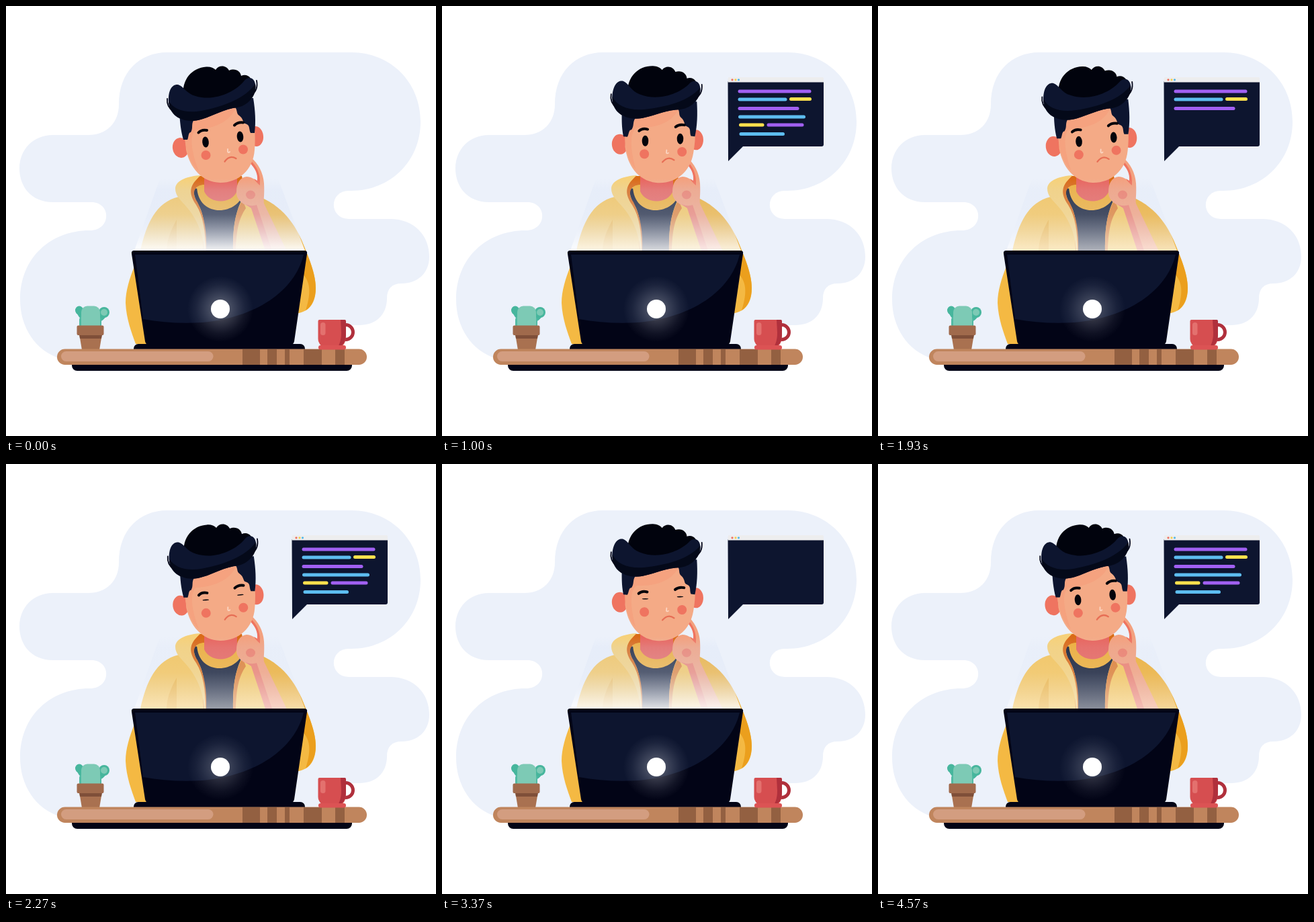
An HTML page with a canvas that plays this animation: 640x640 px, repeating every 4.76 s.

```html
<!DOCTYPE html>
<html lang="en">
<head>
<meta charset="utf-8">
<title>Thinking at the laptop</title>
<style>
html, body { margin: 0; width: 100%; height: 100%; overflow: hidden; background: #fff; }
canvas { display: block; width: 640px; height: 640px; }
</style>
</head>
<body>
<canvas id="stage" width="640" height="640"></canvas>
<script>
const ctx = document.getElementById('stage').getContext('2d');
const LOOP = 4760;
const NAVY = '#0d152f', INK = '#020416', SKIN = '#f4aa86', CORAL = '#ef7460';
const PURPLE = '#a160f2', BLUE = '#5dbdf0', YELLOW = '#ffe14d';

const clamp = v => Math.max(0, Math.min(1, v));
const smooth = v => v * v * (3 - 2 * v);

function fill(d, color) {
  ctx.fillStyle = color;
  ctx.fill(new Path2D(d));
}
function stroke(d, color, width) {
  ctx.strokeStyle = color;
  ctx.lineWidth = width;
  ctx.lineCap = ctx.lineJoin = 'round';
  ctx.stroke(new Path2D(d));
}
function box(x, y, w, h, r, color) {
  ctx.fillStyle = color;
  ctx.beginPath();
  ctx.roundRect(x, y, w, h, r);
  ctx.fill();
}
function oval(x, y, rx, ry, color, turn = 0) {
  ctx.fillStyle = color;
  ctx.beginPath();
  ctx.ellipse(x, y, rx, ry, turn, 0, 7);
  ctx.fill();
}

// Eased value along [time, value] keys.
function along(keys, t) {
  for (let i = 1; i < keys.length; i++) {
    const [t0, a] = keys[i - 1], [t1, b] = keys[i];
    if (t <= t1) return a + (b - a) * smooth(clamp((t - t0) / (t1 - t0)));
  }
  return keys[keys.length - 1][1];
}

const TILT = [[0, 0], [480, 1], [990, .92], [1430, 1], [2190, .1], [2380, 0]];
const LIGHT = [[0, 1], [470, .62], [1000, .88], [1530, .8], [2270, .6],
  [2800, .55], [3370, .92], [3870, .66], [4570, .52]];
const BLINKS = [1170, 2270, 3370, 4470];
const TYPING = [[190, 1450], [1640, 3300], [3485, LOOP]];
const ROW_STEP = 105, ROW_TIME = 70;
const ROWS = [
  [[441, 549, 127, PURPLE]],
  [[441, 513, 139, BLUE], [517.5, 549.5, 138.5, YELLOW]],
  [[441, 531, 152.5, PURPLE]],
  [[441.5, 540.5, 165, BLUE]],
  [[442.5, 479, 177, YELLOW], [484, 538, 177, PURPLE]],
  [[443, 509.5, 190.5, BLUE]]
];

function backdrop() {
  fill(`M240 69H514C573 69 617 114 617 172C617 232 571 275 514 275H510
    C481 275 480 316 510 317H572C607 317 630 341 630 373C630 398 612 413 589 413
    C574 413 567 421 567 435C567 461 549 475 526 475H490V525H82
    C44 514 21 478 21 437C21 376 65 334 125 334C157 334 157 292 127 292H70
    C37 292 20 268 20 242C20 214 40 192 70 192H122C150 192 168 174 168 146
    C168 99 198 69 240 69Z`, '#ecf1fa');
}

function body() {
  fill('M191 388C184 405 178 424 178 442C179 466 187 486 193 503H214L206 380Z', '#f4b943');
  fill('M436 342C452 375 461 400 461 420C461 444 450 456 430 458V340Z', '#f4b943');
  fill('M436 342C452 375 461 400 461 420C461 435 455 448 446 453C453 431 455 412 441 398Z', '#eb9f1d');
  fill('M257 284C223 292 209 324 200 364V385H340L350 270H280Z', '#f6c55a');
  fill('M386 288C421 306 437 338 446 364V385H340L350 270Z', '#efb035');
  fill('M254 318C244 336 239 350 239 366H254Z', '#eeb33f');
  fill('M283 253H351L358 285L340 366H297L296 330Z', '#d96c14');
  fill('M280 271L353 284C346 302 338 323 338 366H298C297 332 295 310 286 295C280 285 279 278 280 271Z', '#172038');
  fill('M284 268C285 318 348 311 353 277L343 266H293Z', '#efae38');
  fill('M295 253V276C303 295 336 296 344 275V253Z', '#e8665f');
  // hood edges
  fill('M282 253C294 252 297 260 294 265C281 268 275 277 285 292C296 315 299 336 298 364H294C294 328 284 307 274 293C266 278 271 257 282 253Z', '#da6a18');
  fill(`M290 252C272 253 252 259 252 272C252 282 259 288 267 297
    C282 314 294 336 295 366H297C297 337 294 313 283 296C270 277 274 266 290 252Z`, '#f6d17a');
  fill('M352 286C343 304 337 325 338 366H387L371 305Z', '#f6c55a');
  fill('M352 288C341 309 338 326 338 364H342C343 334 346 317 357 301Z', '#df8034');
  // hand and forearm
  fill(`M365 226C375 234 383 248 384 264C385 281 383 288 384 294L419 367H387L365 300
    C348 294 342 285 343 276C343 264 348 255 358 254C365 254 370 258 374 261
    C376 251 372 241 362 232Z`, '#f3a17f');
  fill('M352 292C359 298 368 298 373 296L397 367H387L365 301Z', '#ed806f');
  fill('M364 230C373 238 379 249 378 267C373 263 370 259 369 257L374 260C375 250 371 241 362 233Z', CORAL);
  oval(364, 281, 7, 6.5, '#ee806c');
}

function eye(x, y, blink) {
  oval(x, y, 4.8, Math.max(.8, 8 * (1 - blink)), '#03040b', -.1);
}

function head(tilt, blink) {
  ctx.save();
  ctx.translate(318, 260);
  ctx.rotate(tilt * .102);
  ctx.translate(-318, -260);
  oval(260, 211, 12, 15, CORAL, -.15);
  oval(372, 194, 11, 15, CORAL, -.1);
  fill('M264 165L360 140C370 165 372 190 370 214C368 244 346 263 319 263C291 262 274 241 268 214Z', SKIN);
  fill('M264 170L342 151C333 174 306 183 283 184C272 191 276 218 287 246C274 234 268 214 266 198Z', '#f5a27f');
  fill('M258 158L284 165C273 174 280 180 275 188C271 188 272 195 270 199H264C260 185 259 173 258 158Z', NAVY);
  fill('M338 139L368 137C371 156 372 172 370 189H364C361 183 364 177 356 175C352 174 354 168 347 163C342 160 345 153 340 150Z', NAVY);
  fill(`M264 135C261 109 277 92 298 90.5C304 90 309 92 312 95C317 87 328 88 332 96
    C341 92 349 97 350 104C359 100 368 107 366 119C347 139 296 153 264 135Z`, '#01030d');
  fill(`M242 143C241 124 248 116 256 117C264 119 269 131 282 134C311 143 342 127 354 112
    C360 104 369 106 371 116C374 130 363 147 345 151C325 153 309 163 293 168
    C270 176 244 168 242 143Z`, NAVY);
  fill('M242 141C250 155 268 160 291 156C322 150 356 138 371 116C374 130 363 147 345 151C325 153 309 163 293 168C270 176 244 168 242 141Z', '#040919');
  stroke('M240 138C239 147 243 153 250 158M373 111C375 121 372 128 365 133', INK, 1.8);

  const drop = 7 * blink;
  stroke(`M286.5 ${188.5 + drop}Q291 ${183.5 + drop} 299 ${185 + drop}M340 ${177.5 + drop}Q345 ${172.5 + drop} 353 ${173.5 + drop}`, '#03040b', 4);
  eye(297, 202.5, blink);
  eye(348.5, 194.5, blink);
  oval(297.5, 222, 7, 7, CORAL);
  oval(353, 213.5, 7, 7, CORAL);
  stroke('M330 213L330 217Q331 219 333 217', '#fbd5c2', 1.8);
  stroke('M325.5 231.5Q333 221 342.5 227', '#e76e55', 2.2);
  ctx.restore();
}

function beam(light) {
  const g = ctx.createLinearGradient(0, 257, 0, 364);
  g.addColorStop(0, 'rgba(207,220,245,0)');
  g.addColorStop(.15, 'rgba(207,220,245,.2)');
  g.addColorStop(.5, 'rgba(222,230,246,.34)');
  g.addColorStop(1, 'rgba(255,255,255,.95)');
  ctx.globalAlpha = light;
  fill('M229 257H405L445 364H191Z', g);
  ctx.globalAlpha = 1;
}

function laptop(light) {
  box(190, 503, 255, 12, [7, 7, 0, 0], INK);
  fill('M191 364H444Q449 364 448 369L429 499Q428 504 424 504H212Q208 504 207 499L187 369Q186 364 191 364Z', INK);
  fill('M192 370H443C430 424 372 464 292 471C262 473 232 471 204 466Z', NAVY);
  const g = ctx.createRadialGradient(319, 451, 8, 319, 451, 49);
  g.addColorStop(0, 'rgba(255,255,255,.3)');
  g.addColorStop(.35, 'rgba(220,224,235,.2)');
  g.addColorStop(.7, 'rgba(200,205,220,.08)');
  g.addColorStop(1, 'rgba(200,205,220,0)');
  ctx.globalAlpha = .4 + .6 * light;
  oval(319, 451, 49, 49, g);
  ctx.globalAlpha = 1;
  oval(319, 451, 14, 14, '#fff');
}

function desk() {
  box(98, 528, 417, 15, [0, 0, 8, 8], INK);
  box(76, 510.5, 461, 23.5, 11.7, '#c0855d');
  box(82, 514, 226.5, 15, 7.5, '#d39d80');
  for (const [x, w] of [[352, 26], [389, 14], [415, 7], [443, 27], [490, 14]])
    box(x, 511, w, 23, 0, '#936041');
}

function cactus() {
  stroke('M109 453Q110 462 120 466M146 456Q146 464 134 468', '#47b69d', 8);
  oval(109, 453, 6, 6.5, '#47b69d');
  oval(146, 456, 8, 8, '#47b69d');
  oval(146, 456, 5, 5, '#7dcab5');
  box(109, 462, 33, 18, 5, '#52baa3');
  box(112, 446.5, 28, 34, [9, 9, 0, 0], '#7dcab5');
  fill('M109 488H143L139 512H113Z', '#a97150');
  fill('M109 489H143L142 495H110Z', '#7f4f39');
  box(105.5, 475.5, 40, 14.5, 2, '#a06a4c');
}

function mug() {
  ctx.strokeStyle = '#b0303c';
  ctx.lineWidth = 5;
  ctx.beginPath();
  ctx.arc(505.5, 485.5, 11, 0, 7);
  ctx.stroke();
  box(464.5, 467, 41, 42, [2, 2, 14, 14], '#d64e50');
  fill('M498 467H504Q506 467 506 469V490C506 500 501 506 494 508C498 500 499 494 499 486Z', '#b0303c');
  box(468, 471, 7.5, 19, 3.5, '#e3716e');
  box(465, 505, 41, 6.5, 3.2, '#dc5354');
}

function codeRows(t) {
  const run = TYPING.find(([start, end]) => t >= start && t < end);
  if (!run) return;
  ROWS.forEach((row, i) => {
    const p = clamp((t - run[0] - i * ROW_STEP) / ROW_TIME);
    row.forEach(([x0, x1, y, color], k) => {
      const part = clamp(p * row.length - k);
      if (part > 0) box(x0 - .5, y - 2.5, (x1 - x0 + 1) * part, 5, 2.5, color);
    });
  });
}

function bubble(t) {
  if (t < 30) return;
  // Grows out of the tail, slightly past full size, then settles.
  const scale = along([[10, 0], [190, 1.03], [290, 1]], t);
  ctx.save();
  ctx.translate(426, 230);
  ctx.scale(scale, scale);
  ctx.translate(-426, -230);
  fill('M425.5 112H568V206Q568 209 565 209H448L426 231Z', NAVY);
  box(425.5, 106, 142.5, 7.5, [2, 2, 0, 0], '#ededee');
  oval(432, 109.8, 1.6, 1.6, '#ee7160');
  oval(437, 109.8, 1.6, 1.6, '#f5cf4e');
  oval(441.5, 109.8, 1.6, 1.6, '#52b7e8');
  codeRows(t);
  ctx.restore();
}

function draw(t) {
  const tilt = along(TILT, Math.min(t, 4570) % 2380);
  const light = along(LIGHT, t);
  const blink = Math.max(...BLINKS.map(c => clamp((90 - Math.abs(t - c)) / 65)));
  ctx.fillStyle = '#fff';
  ctx.fillRect(0, 0, 640, 640);
  backdrop();
  body();
  head(tilt, blink);
  beam(light);
  cactus();
  laptop(light);
  desk();
  mug();
  bubble(t);
}

const began = performance.now();
function tick() {
  draw((performance.now() - began) % LOOP);
  requestAnimationFrame(tick);
}
tick();
</script>
</body>
</html>
```
